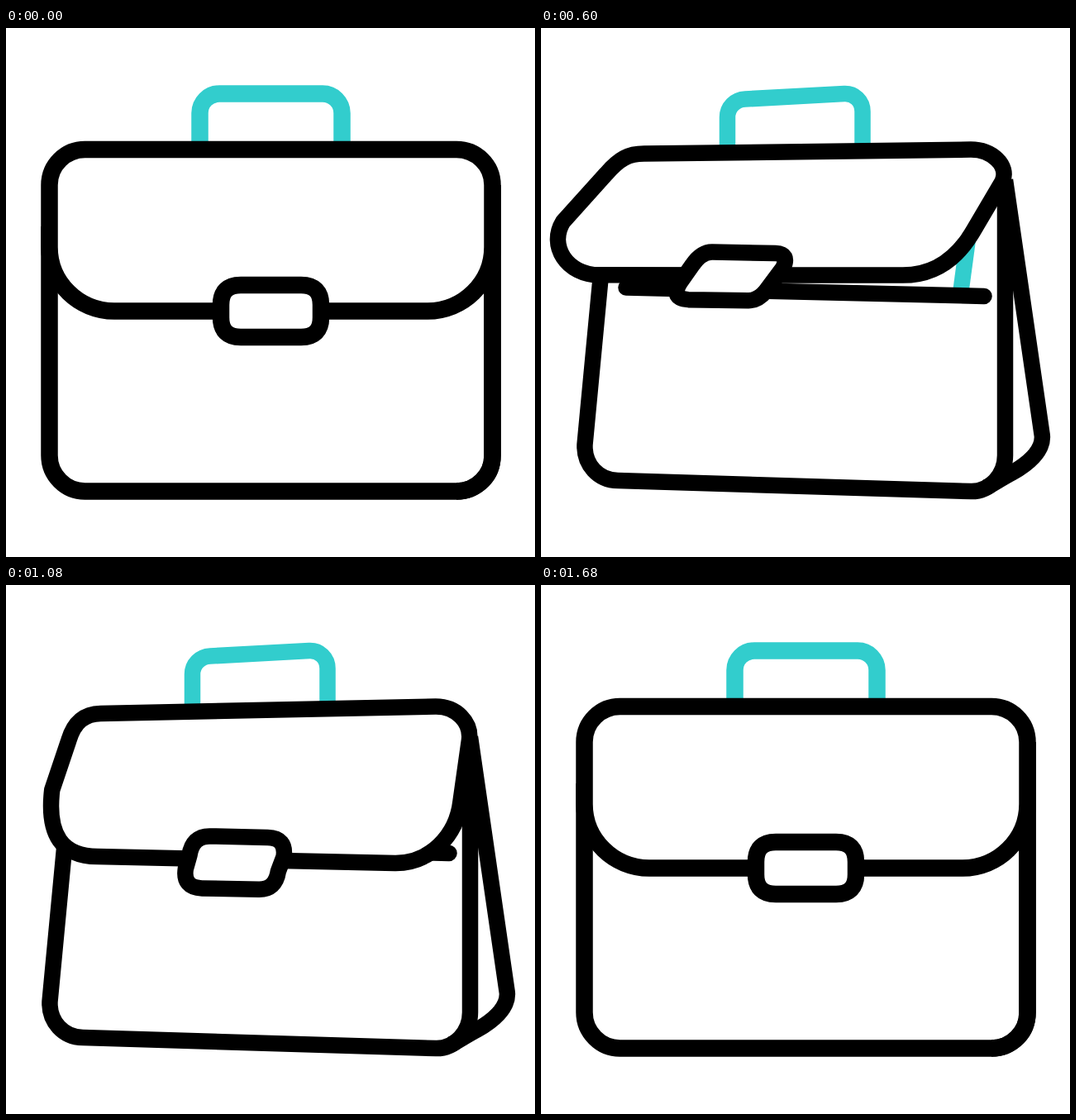
Recreate the animation shown at these times as an HTML page. Size 640x640 px, loop 2.2 s.

```html
<!DOCTYPE html>
<html>
<head>
<meta charset="utf-8">
<style>
  html, body { margin: 0; height: 100%; overflow: hidden; background: #fff; }
  svg { display: block; width: 100vw; height: 100vh; }
  path { fill: none; stroke: #000; stroke-linejoin: round; }
  .accent { stroke: #32cdcd; }
  .filled { fill: #fff; }
</style>
</head>
<body>
<svg id="stage" viewBox="0 0 640 640">
  <path id="handle" class="accent"/>
  <path id="side"/>
  <path id="body"/>
  <path id="paper" class="accent"/>
  <path id="rim" stroke-linecap="round"/>
  <path id="flap" class="filled"/>
  <path id="clasp" class="filled"/>
</svg>
<script>
const LOOP = 2200, STEP = 40;

// Each part: flat front view, turned view and, where it lifts, open view.
const shapes = {
  handle: [
    'M234.5 148L234.5 103C234.5 90 245 79.5 258 79.5L383 79.5C396 79.5 406.5 90 406.5 103L406.5 148',
    'M225.5 148L225.5 108C225.5 96 235 86.5 247 86L367 79.5C379 79 389 88 389 101L389 148'],
  side: [
    'M588.5 190L588.5 517C588.5 530 584 540 577 547C568 556 556 560.5 545 560.5',
    'M561.5 184L606.3 493C608 512 588 528 570 538C555 546 545 553 538 556'],
  body: [
    'M52.5 240L52.5 517C52.5 541 72 560.5 95.5 560.5L545 560.5C569 560.5 588.5 541 588.5 517L588.5 190',
    'M78 240L53 504C52 528 69 547 93 547.5L520 560.5C543 561 561.5 541 561.5 517L561.5 188'],
  paper: ['M535 240L525 318', 'M518.5 240L508 318'],
  rim: ['M110 320L520 320', 'M103 314L536 324.5'],
  flap: [
    'M52.5 190C52.5 166 72 147 95.5 147L545 147C569 147 588.5 166 588.5 190L588.5 265C588.5 308 553 342.5 510 342.5L131 342.5C88 342.5 52.5 308 52.5 265Z',
    'M74.5 190C77 167 90 156.5 110 156L520 147C545 147 561.5 166 561.5 188L561.5 265C561.5 308 527 343 485 342.5L128 333.5C85 333 67 310 68.5 250Z',
    'M79 176C95 158 106 152 125 152L520 147C545 147 567 166 558 186L523 244C507 271 481 298 437 298L70 298C30 298 8 262 26 234Z'],
  clasp: [
    'M260 335Q260 311 284 311L357 311Q381 311 381 335L381 350Q381 374 357 374L284 374Q260 374 260 350Z',
    'M239 334Q239.5 309 264 309.3L331 311Q356 311.5 355 335L354.5 351Q354 375 330 374.5L263 373.3Q239 372.5 239 349Z',
    'M182 286Q193 270 206 270L283 271.5Q300 272 292 289L271 317Q261 329 249 328.5L177 327.5Q155 326 167 307Z']
};

// Blends the numbers of two paths; amount(i) gives the weight of the i-th number.
function mix(from, to, amount) {
  const target = to.match(/[\d.]+/g);
  let i = 0;
  return from.replace(/[\d.]+/g, n => {
    const k = amount(i);
    return (+n + (target[i++] - n) * k).toFixed(2);
  });
}

function ease(t, start, end) {
  const u = Math.min(1, Math.max(0, (t - start) / (end - start)));
  return u * u * (3 - 2 * u);
}

function draw(t) {
  const turn = ease(t, 0, 415) - ease(t, 1265, 1680);
  const early = 1 - (1 - turn) ** 2;
  const late = turn ** 2;
  const open = ease(t, 420, 585) - ease(t, 585, 792) + ease(t, 792, 940) - ease(t, 940, 1160);

  const turnOf = {
    body: i => i > 1 && i < 10 ? late : turn,
    flap: i => i < 8 || i > 23 ? early : turn,
    clasp: () => early
  };
  const lift = i => i % 2 ? open ** 1.65 : open;

  for (const [id, [flat, turned, opened]] of Object.entries(shapes)) {
    let d = mix(flat, turned, turnOf[id] || (() => turn));
    if (opened) d = mix(d, opened, lift);
    document.getElementById(id).setAttribute('d', d);
  }
  document.getElementById('stage').setAttribute('stroke-width', 20.5 - turn);
}

function tick() {
  draw(Math.floor(performance.now() % LOOP / STEP) * STEP);
  requestAnimationFrame(tick);
}
tick();
</script>
</body>
</html>
```
